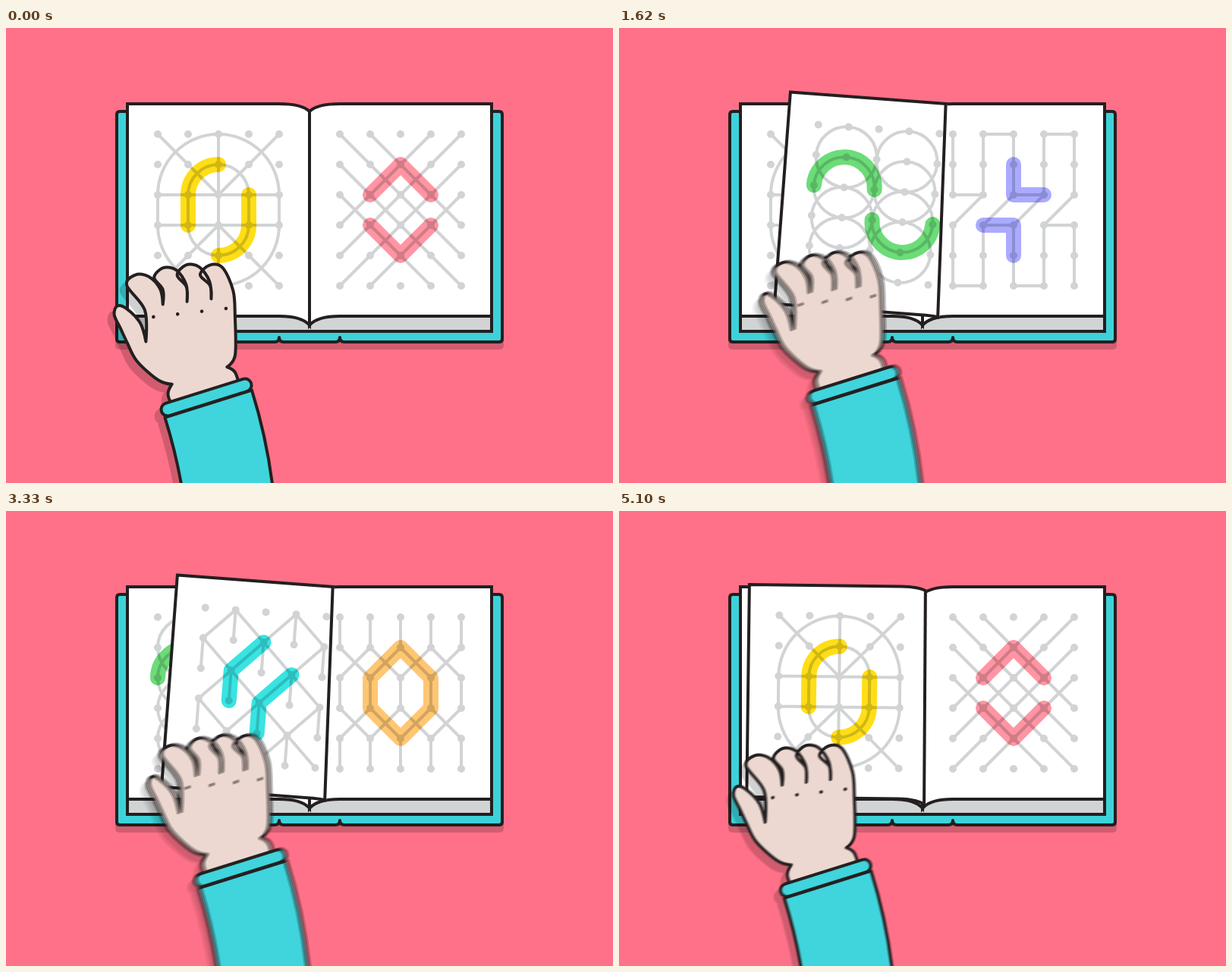
An HTML page with a canvas for the animation above (5.13 s loop, 800 px wide and 600 px high).

```html
<!DOCTYPE html>
<html lang="en">
<head>
<meta charset="utf-8">
<title>Pattern book</title>
<style>
html, body { margin: 0; width: 100%; height: 100%; overflow: hidden; background: #ff7188; }
canvas { display: block; }
</style>
</head>
<body>
<canvas id="stage" width="800" height="600"></canvas>
<script>
const INK = '#231f20', TEAL = '#3dd2d9', SKIN = '#ecd7d0', GREY = '#d1d3d4', PINK = '#ff7188';
const SHADE = 'rgba(0,0,0,.18)';
const CYCLE = 1710, REACH = 1200, TURN = 525, SHUTTER = 10, SAMPLES = 4;
const ctx = document.getElementById('stage').getContext('2d');

function layer() {
  const c = document.createElement('canvas');
  c.width = 800;
  c.height = 600;
  return c.getContext('2d');
}
const sharp = layer(), blurred = layer();

const mix = (a, b, k) => a + (b - a) * k;
const smooth = (from, to, v) => {
  const k = Math.min(1, Math.max(0, (v - from) / (to - from)));
  return k * k * (3 - 2 * k);
};

// cubic-bezier(.38, 0, .2, 1)
function glide(time) {
  let lo = 0, hi = 1, s;
  for (let i = 0; i < 20; i++) {
    s = (lo + hi) / 2;
    const r = 1 - s;
    if (1.14 * r * r * s + .6 * r * s * s + s * s * s < time) lo = s; else hi = s;
  }
  return 3 * s * s - 2 * s * s * s;
}

// ---- pages ----
const join = (xs, f) => xs.map(f).join('');
const LEFT = [200, 240, 280, 320, 360], RIGHT = LEFT.map(x => x + 240);
const ROWS = [140, 180, 220, 260, 300, 340];

const track = r => `M${280 - r} 220a${r} ${r} 0 0 1 ${2 * r} 0v40a${r} ${r} 0 0 1-${2 * r} 0z`;
const rays = track(80) + track(40) +
  'M280 140v200M200 220h160m0 40h-160M200 140l80 80l80-80M200 340l80-80l80 80';
const diagonals = join([1, -1], s => join([140, 180],
    y => `M${520 - 80 * s} ${y}l${160 * s} 160`) +
  `M${520 - 40 * s} 140l${120 * s} 120M${520 - 80 * s} 220l${120 * s} 120`);
const circles = join([240, 320], x => join(ROWS.slice(1, 5),
  y => `M${x - 40} ${y}a40 40 0 0 1 80 0a40 40 0 0 1-80 0`));
const meander = 'M440 140v80h40v-80h40v80h40v-80h40v80l-40 40' +
  'M480 220l-40 40v80h40v-80h40v80h40v-80h40v80M480 260l40-40M520 260l40-40';
const lattice = join([240, 320], x => join([140, 220, 300],
    y => `M${x} ${y + 40}v-40l40 40m-80 0l40-40` + (y > 140 ? 'l40-40m-80 0l40 40' : ''))) +
  join([200, 280, 360], x => `M${x} 180v40m0 40v40`);
const honeycomb = join(RIGHT, x => `M${x} 140v40m0 40v40m0 40v40`) +
  join(RIGHT.slice(0, 4), x => join([180, 260], y => `M${x} ${y}l40 40m0-40l-40 40`));

const page = (columns, color, lines, mark) =>
  ({ columns, color, lines: new Path2D(lines), mark: new Path2D(mark) });

const spreads = [
  [page(LEFT, '#ffde17', rays, 'M280 180a40 40 0 0 0-40 40v40M320 220v40a40 40 0 0 1-40 40'),
   page(RIGHT, '#ff95a3', diagonals, 'M480 220l40-40l40 40m0 40l-40 40l-40-40')],
  [page(LEFT, '#6cdc78', circles, 'M200 220a40 40 0 0 1 80 0m0 40a40 40 0 0 0 80 0'),
   page(RIGHT, '#aaaaff', meander, 'M520 180v40h40M480 260h40v40')],
  [page(LEFT, '#38e4e2', lattice, 'M280 180l-40 40v40M320 220l-40 40v40'),
   page(RIGHT, '#ffc672', honeycomb, 'M520 180l40 40v40l-40 40l-40-40v-40z')]
];

const sheet = new Path2D('M160 100H360Q390 100 400 110V392Q390 380 360 380H160Z');

function outline(g, path, fill) {
  g.fillStyle = fill;
  g.fill(path);
  g.strokeStyle = INK;
  g.lineWidth = 4;
  g.stroke(path);
}

function drawPage(p) {
  ctx.save();
  if (p.columns === RIGHT) {
    ctx.translate(800, 0);
    ctx.scale(-1, 1);
  }
  ctx.lineJoin = 'miter';
  outline(ctx, sheet, '#fff');
  ctx.restore();

  ctx.save();
  ctx.lineCap = ctx.lineJoin = 'round';
  ctx.strokeStyle = ctx.fillStyle = GREY;
  ctx.lineWidth = 4;
  ctx.stroke(p.lines);
  ctx.beginPath();
  for (const x of p.columns) for (const y of ROWS) {
    ctx.moveTo(x + 5, y);
    ctx.arc(x, y, 5, 0, 7);
  }
  ctx.fill();
  ctx.globalCompositeOperation = 'multiply';
  ctx.strokeStyle = p.color;
  ctx.lineWidth = 20;
  ctx.stroke(p.mark);
  ctx.restore();
}

// ---- book ----
const cover = new Path2D('M150 110H650q4 0 4 4V410q0 4-4 4H446q-6 0-6-6q0 6-6 6H366q-6 0-6-6' +
  'q0 6-6 6H150q-4 0-4-4V114q0-4 4-4z');
const block = new Path2D('M160 370H640V400H160Z');

function drawCover() {
  ctx.fillStyle = SHADE;
  ctx.beginPath();
  ctx.roundRect(144, 116, 512, 308, 5);
  ctx.fill();
  ctx.lineJoin = 'round';
  outline(ctx, cover, TEAL);
  ctx.lineJoin = 'miter';
  outline(ctx, block, GREY);
}

// Position of the dragged page corner, relative to its resting place.
function corner(c) {
  const p = c < REACH ? 0 : (1 - Math.cos(Math.PI * (c - REACH) / TURN)) / 2;
  return { p, shift: 480 * p, lift: 56 * Math.sin(Math.PI * p) };
}

function drawPages(now, next, { p, shift, lift }) {
  drawPage(now[0]);
  if (p < 1e-4) return drawPage(now[1]);
  drawPage(next[1]);

  // The fold is the perpendicular bisector of the corner's travel.
  const tilt = Math.atan2(lift, shift);
  const inFoldFrame = draw => {
    ctx.save();
    ctx.translate(640 - shift / 2, 380 - lift / 2);
    ctx.rotate(tilt);
    draw();
    ctx.restore();
  };
  ctx.save();
  ctx.beginPath();
  inFoldFrame(() => ctx.rect(-900, -900, 900, 1800));
  ctx.clip();
  drawPage(now[1]);

  ctx.translate(640 - shift, 380 - lift);
  ctx.rotate(2 * tilt);
  ctx.translate(-160, -380);
  drawPage(next[0]);
  ctx.clip(sheet);
  ctx.setTransform(1, 0, 0, 1, 0, 0);
  inFoldFrame(() => {
    ctx.strokeStyle = INK;
    ctx.lineWidth = 8;
    ctx.beginPath();
    ctx.moveTo(0, -600);
    ctx.lineTo(0, 600);
    ctx.stroke();
  });
  ctx.restore();
}

// ---- hand ----
// Key joints, relative to the middle of the cuff. "gaps" are the first and last finger gap;
// "width" and "curl" shape all four fingers.
const fist = {
  base: [-78, -100], web: [-54, -94], thumb: [-76, -150], index: [-41, -182],
  middle: [-3, -180], pinky: [56, -165], gaps: [-18, -134, 45, -122], width: [15.5], curl: [6]
};
const open = {
  base: [-82, -86], web: [-59, -90], thumb: [-103, -139], index: [-63, -205],
  middle: [-24, -214], pinky: [52, -199], gaps: [-28, -134, 33, -135], width: [9.5], curl: [2]
};
const grip = {
  base: [-62, -104], web: [-27, -109], thumb: [-30, -195], index: [2, -211],
  middle: [50, -172], pinky: [87, -125], gaps: [24, -129, 64, -98], width: [13], curl: [12]
};

const blend = (a, b, k) => Object.fromEntries(Object.keys(a).map(
  key => [key, a[key].map((v, i) => mix(v, b[key][i], k))]));
const between = (a, b, k = .5) => [mix(a[0], b[0], k), mix(a[1], b[1], k)];
const shifted = (a, d, k = 1) => [a[0] + d[0] * k, a[1] + d[1] * k];

function handAt(c) {
  if (c < REACH) {
    const m = glide(c / REACH);
    return {
      x: mix(264, 559, m), y: mix(487, 533.5, m ** 1.15), angle: mix(-17.4, 29.4, m * m),
      pose: blend(blend(fist, open, smooth(0, 330, c)), grip, smooth(430, 930, c))
    };
  }
  const { p, shift, lift } = corner(c), q = smooth(.1, .85, p);
  return {
    x: 640 - shift + mix(-81, 104, q), y: mix(533.5, 487, q) - lift,
    angle: mix(29.4, -17.4, q), pose: blend(grip, fist, q)
  };
}

const gap = (pose, i) => between(pose.gaps.slice(0, 2), pose.gaps.slice(2), i / 2);

// Up one side, over the rounded tip and halfway down the other side.
function digit(left, right, tip, width, bendLeft, bendRight) {
  const root = between(left, right);
  const dx = tip[0] - root[0], dy = tip[1] - root[1], length = Math.hypot(dx, dy);
  const along = [dx / length, dy / length], across = [-along[1], along[0]];
  const neck = shifted(tip, along, -8.5);
  const a = shifted(neck, across, -width), b = shifted(neck, across, width);
  return [shifted(between(left, a), across, bendLeft), a, tip, b,
    shifted(between(right, b), across, bendRight)];
}

function handPath(pose) {
  const { base, web, thumb, index, middle, pinky } = pose;
  const [width] = pose.width, [curl] = pose.curl;
  const edge = between(gap(pose, 3), [52, -42], .35);
  const tips = [index, middle, shifted(between(middle, pinky), [0, -2]), pinky];
  const points = [], creases = new Set();
  const crease = p => { creases.add(points.length); points.push(p); };

  crease([-46, 0]);
  points.push([-47, -19]);
  crease([-38, -30]);
  points.push([-54, -41], shifted(base, [5, 27]), base, ...digit(base, web, thumb, 9, 0, 6));
  tips.forEach((tip, i) => {
    const left = i ? gap(pose, i - 1) : web, right = i < 3 ? gap(pose, i) : edge;
    crease(left);
    points.push(...digit(left, right, tip, width, i ? curl : 2 * curl, curl));
  });
  points.push(edge, [53, -42]);
  crease([38, -30]);
  points.push([46, -20]);
  crease([46, 0]);

  const slope = i => creases.has(i) ? [0, 0] :
    [0, 1].map(k => (points[i + 1][k] - points[i - 1][k]) / 6);
  const path = new Path2D();
  path.moveTo(...points[0]);
  for (let i = 1; i < points.length; i++) {
    path.bezierCurveTo(...shifted(points[i - 1], slope(i - 1)),
      ...shifted(points[i], slope(i), -1), ...points[i]);
  }
  return path;
}

function drawHand(g, { x, y, angle, pose }) {
  g.clearRect(0, 0, 800, 600);
  g.save();
  g.translate(x, y);
  g.rotate(angle * Math.PI / 180);
  g.lineCap = g.lineJoin = 'round';

  outline(g, handPath(pose), SKIN);
  g.fillStyle = INK;
  for (let i = 0; i < 4; i++) {
    g.beginPath();
    g.arc(...shifted(gap(pose, i - .5), [-1, 15]), 2.3, 0, 7);
    g.fill();
  }

  const bend = 4 * (angle * .3 - 2);
  outline(g, new Path2D(`M-60 9Q-60 111 ${bend - 60} 211H${bend + 60}Q60 111 60 9Z`), TEAL);
  for (const [color, width] of [[INK, 21], [TEAL, 13]]) {
    g.strokeStyle = color;
    g.lineWidth = width;
    g.beginPath();
    g.moveTo(-53.5, 0);
    g.lineTo(53.5, 0);
    g.stroke();
  }
  g.restore();
}

// Averages a few moments around c for motion blur.
function drawBlurredHand(c) {
  blurred.clearRect(0, 0, 800, 600);
  blurred.globalCompositeOperation = 'lighter';
  blurred.globalAlpha = 1 / SAMPLES;
  for (let i = 0; i < SAMPLES; i++) {
    const moment = c + ((i + .5) / SAMPLES - .5) * SHUTTER;
    drawHand(sharp, handAt(Math.min(CYCLE, Math.max(0, moment))));
    blurred.drawImage(sharp.canvas, 0, 0);
  }
  ctx.save();
  ctx.shadowColor = SHADE;
  ctx.shadowOffsetX = mix(-7, 2, (handAt(c).angle + 17.4) / 46.8);
  ctx.shadowOffsetY = 9;
  ctx.drawImage(blurred.canvas, 0, 0);
  ctx.restore();
}

// ---- loop ----
const start = performance.now();

function frame() {
  const t = (performance.now() - start) % (3 * CYCLE);
  const i = Math.floor(t / CYCLE), c = t % CYCLE;
  ctx.fillStyle = PINK;
  ctx.fillRect(0, 0, 800, 600);
  drawCover();
  drawPages(spreads[i], spreads[(i + 1) % 3], corner(c));
  drawBlurredHand(c);
  requestAnimationFrame(frame);
}
frame();
</script>
</body>
</html>
```
